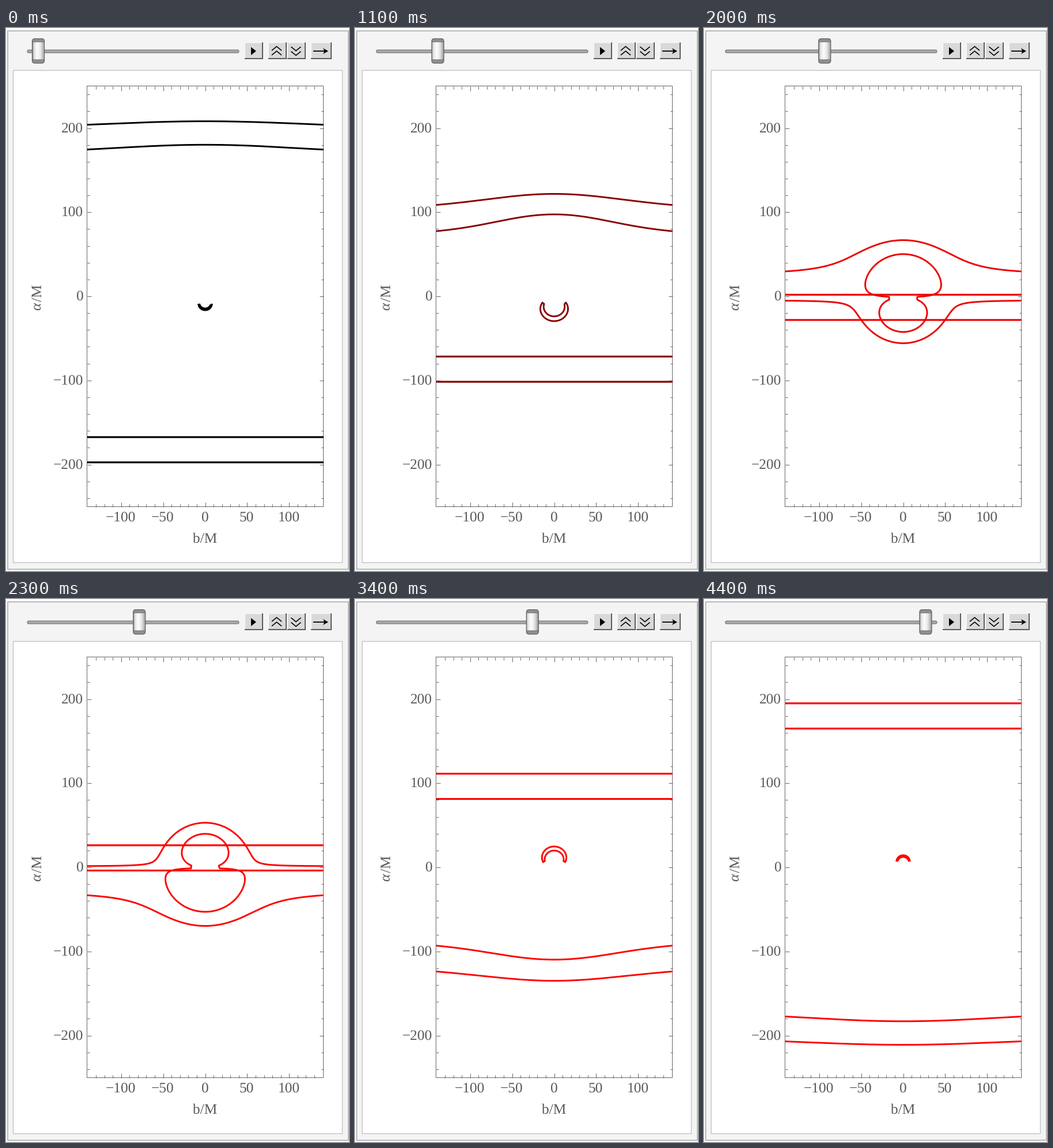
A matplotlib script for the animation above (4500 ms loop, 595 by 941 pixels).

```python
import numpy as np
import matplotlib.pyplot as plt
from matplotlib.animation import FuncAnimation
from matplotlib.collections import LineCollection
from matplotlib.patches import FancyBboxPatch, Polygon, Rectangle

W, H, DPI = 595, 941, 100
PT = 72 / DPI                      # points per pixel
X0, Y0, SCALE = 345.5, 465.0, 1.4575
LEFT, RIGHT, TOP, BOTTOM = 140.5, 550.5, 100.5, 829.5
GREY, INK = "#666666", "#5a5a5a"

# 100 ms ticks at which the slider moves on by one step
TICKS = [1, 3, 4, 6, 7, 9, 10, 11, 13, 14, 16, 17, 19, 20, 22,
         23, 25, 26, 28, 29, 31, 32, 34, 35, 36, 38, 39, 41, 42, 44]
STEPS = [0, 8, 14, 23, 30]
HEIGHTS = [-197.4, -101.6, -28.1, 81.3, 165.0]

GAP, HALF = 30.0, 150.0            # size of the moving strip
EINSTEIN2 = 2805.0                 # squared Einstein radius
LENS_Y, LAG = -1.0, 1.65

plt.rcParams["text.hinting"] = "none"
fig = plt.figure(figsize=(W / DPI, H / DPI), dpi=DPI, facecolor="white")
ax = fig.add_axes([0, 0, 1, 1])
ax.axis("off")
ax.set_xlim(0, W)
ax.set_ylim(H, 0)
ax.set_autoscale_on(False)


def px(b):
    return X0 + SCALE * np.asarray(b)


def py(a):
    return Y0 - SCALE * np.asarray(a)


def box(x0, y0, x1, y1, face, edge="none", lw=1.0, z=1):
    return ax.add_patch(Rectangle((x0, y0), x1 - x0, y1 - y0, fc=face,
                                  ec=edge, lw=lw * PT, zorder=z))


def pill(x0, y0, x1, y1, radius, face, edge, lw=1.0, z=1):
    style = f"round,pad=0,rounding_size={radius}"
    return ax.add_patch(FancyBboxPatch((x0, y0), x1 - x0, y1 - y0,
                                       boxstyle=style, fc=face, ec=edge,
                                       lw=lw * PT, zorder=z))


def stroke(xs, ys, color="black", lw=1.6, z=4):
    return ax.plot(xs, ys, color=color, lw=lw * PT, zorder=z, snap=False,
                   solid_capstyle="butt", solid_joinstyle="miter")[0]


def label(x, y, s, ha="center", **kw):
    ax.text(x, y, s, ha=ha, va="baseline", color=INK, family="Liberation Serif",
            fontsize=25.4 * PT, zorder=4, **kw)


def button(x0, x1, y0=25, y1=54):
    box(x0, y0, x1, y1, "#d9d9d9")
    stroke([x0 + .5, x0 + .5, x1], [y1, y0 + .5, y0 + .5], "#f8f8f8", 1, 2)
    stroke([x0, x1 - 1, x1 - 1], [y1 - 1, y1 - 1, y0], "#5c5c5c", 2, 3)


def draw_panel():
    box(3, 5, 594, 938, "#f4f4f4", "#a9a9a9", 1.6)
    box(12, 73, 583, 926, "white", "#c2c2c2", 1.4)
    pill(37, 38, 404, 43, 2.4, "#a8a8a8", "#747474", 1.1, 2)
    for x0, x1 in ((414, 446), (455, 487), (488, 520), (529, 565)):
        button(x0, x1)
    ax.add_patch(Polygon([(425, 33), (434, 40), (425, 47)], fc="black", zorder=4))
    for y in (32, 40):
        stroke([461, 469.5, 478], [y + 7, y, y + 7])
        stroke([494.5, 503, 511.5], [y + .5, y + 7.5, y + .5])
    stroke([533, 553], [40, 40], lw=1.8)
    ax.add_patch(Polygon([(550, 35), (559, 40), (550, 45), (552.5, 40)],
                         fc="black", zorder=4))


def draw_axes():
    stroke([LEFT, RIGHT, RIGHT, LEFT, LEFT], [TOP, TOP, BOTTOM, BOTTOM, TOP],
           GREY, 1, 3)
    ticks = []
    for b in range(-130, 131, 10):
        x, n = float(px(b)), 8 if b % 50 == 0 else 5
        ticks += [[(x, TOP), (x, TOP + n)], [(x, BOTTOM), (x, BOTTOM - n)]]
    for a in range(-240, 241, 20):
        y, n = float(py(a)), 7 if a % 100 == 0 else 4
        ticks += [[(LEFT, y), (LEFT + n, y)], [(RIGHT, y), (RIGHT - n, y)]]
    ax.add_collection(LineCollection(ticks, colors=GREY, linewidths=PT, zorder=3))
    for a in range(-200, 201, 100):
        label(134, float(py(a)) + 7, str(a).replace("-", "\u2212"), ha="right")
    for b in range(-100, 101, 50):
        label(float(px(b)) - .8, 855, str(b).replace("-", "\u2212"))
    label(345.3, 892, "b/M")
    turn = dict(ha="left", rotation=90, rotation_mode="anchor")
    label(61.5, 488.5, "\u03b1", style="italic", **turn)
    label(61.5, 473.5, "/M", **turn)


draw_panel()
draw_axes()

# Slider thumb: dark rounded back with a glossy face
thumb = pill(45.5, 18.5, 66.5, 61, 4.5, "#909090", "#5f5f5f", 1.2, 5)
gloss = np.interp(np.linspace(0, 1, 40), [0, .12, .4, .7, 1],
                  [.74, .9, .99, .9, .66])
face = ax.imshow(gloss[None, :], cmap="gray", vmin=0, vmax=1, aspect="auto",
                 extent=(46.5, 65.5, 55, 24), zorder=6)
rims = [stroke([46, 66], [y, y], "#6c6c6c", 1, 7) for y in (24, 55)]
ax.set_xlim(0, W)
ax.set_ylim(H, 0)

window = Rectangle((140.6, 100), 410.4, 730, transform=ax.transData)
rails = [stroke([], [], lw=3.2, z=8) for _ in range(2)]
images = [stroke([], [], lw=2.9, z=8) for _ in range(2)]
for line in rails + images:
    line.set_clip_path(window)

sweep = np.linspace(-HALF, HALF, 1501)
side = np.linspace(0, 1, 60)


def outline(low):
    """Closed strip as the lens sees it, mirrored in height."""
    x = np.concatenate([sweep, np.full(60, HALF), sweep[::-1], np.full(60, -HALF),
                        sweep[:2]])
    y = low + GAP * np.concatenate([np.zeros(1501), side, np.ones(1501),
                                    side[::-1], np.zeros(2)])
    return x, -(y + LAG)


def lens(x, y, sign):
    k = (1 + sign * np.sqrt(1 + 4 * EINSTEIN2 / (x * x + y * y + 1e-9))) / 2
    return px(k * x), py(k * y + LENS_Y)


def update(i):
    step = int(np.searchsorted(TICKS, i, side="right"))
    low = np.interp(step, STEPS, HEIGHTS)
    color = (min(1, step / 15), 0, 0)

    for rail, a in zip(rails, (low, low + GAP)):
        rail.set_data([130, 560], [py(a)] * 2)
    x, y = outline(low)
    for image, sign in zip(images, (1, -1)):
        image.set_data(*lens(x, y, sign))
    for line in rails + images:
        line.set_color(color)

    cx = 56 + 10.95 * step
    thumb.set_x(cx - 10.5)
    face.set_extent((cx - 9.5, cx + 9.5, 55, 24))
    for rim in rims:
        rim.set_xdata([cx - 10, cx + 10])
    return rails + images + rims + [thumb, face]


anim = FuncAnimation(fig, update, frames=45, interval=100, repeat=True,
                     repeat_delay=0, init_func=lambda: update(0), blit=False)
plt.show()
```
